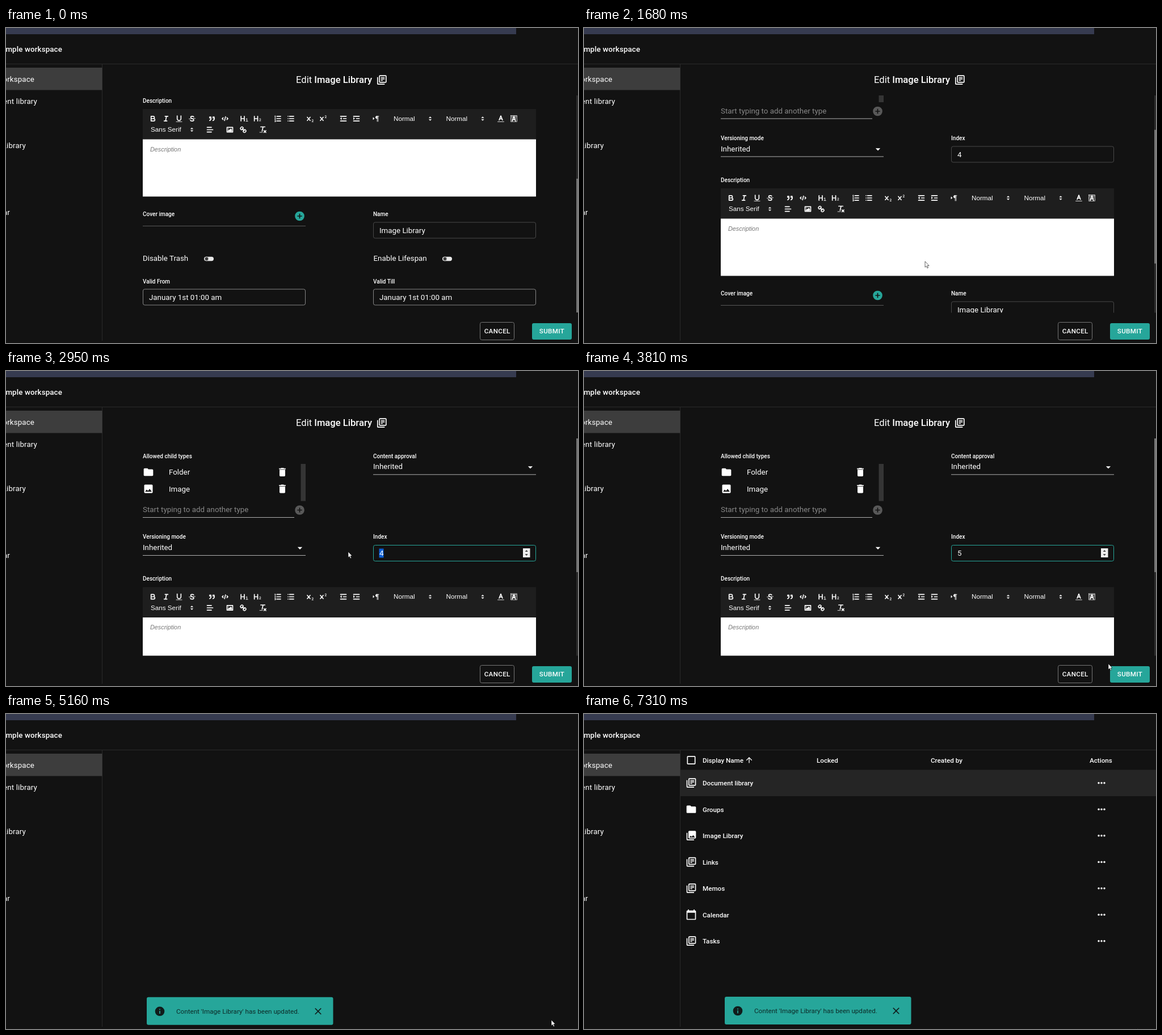
An HTML page for the animation above (7.54 s loop, 1008 by 556 pixels).

```html
<!DOCTYPE html>
<html lang="en">
<head>
<meta charset="utf-8">
<style>
  html, body { margin: 0; width: 100%; height: 100%; overflow: hidden; background: #121212; }
  svg { display: block; }
  text { font: 13.33px Roboto, sans-serif; fill: #fff; white-space: pre; }
  text.label { font-size: 10px; font-weight: 500; }
  text.cell { font-size: 11.66px; font-weight: 500; }
  text.nav { letter-spacing: .125px; text-anchor: end; }
  text.button { font-size: 11.66px; font-weight: 500; letter-spacing: .33px; text-anchor: middle; }
  text.picker { font: 500 11.66px "Liberation Sans", sans-serif; }
  text.hint { font: italic 10.83px "Liberation Sans", sans-serif; fill: #777; }
  .tool { fill: none; stroke: #fff; stroke-width: 2; stroke-linecap: round; stroke-linejoin: round; }
  .tool .thin { stroke-width: 1; }
  .tool .solid { fill: #fff; stroke-width: 1; }
</style>
</head>
<body>
<svg width="1008" height="556" viewBox="0 0 1008 556">
  <defs>
    <clipPath id="formClip"><rect x="230" y="119" width="774" height="383.5"/></clipPath>
    <clipPath id="buttonClip"><rect x="927" y="521" width="70" height="29" rx="3"/></clipPath>
  </defs>
  <g id="shell"></g>
  <g id="editor">
    <g id="heading"></g>
    <g clip-path="url(#formClip)"><g id="form"></g></g>
    <g id="footer"></g>
  </g>
  <g id="list"></g>
  <g id="toast"></g>
  <g id="cursor" stroke-linejoin="round"></g>
</svg>
<script>
const LOOP = 7540, TEAL = '#26a69a', SCROLL = 238.5;
const $ = id => document.getElementById(id);

const rect = (x, y, w, h, fill, extra = '') =>
  `<rect x="${x}" y="${y}" width="${w}" height="${h}" fill="${fill}" ${extra}/>`;
const box = (x, y, w, h, color, extra = '') => rect(x, y, w, h, 'none', `rx="3" stroke="${color}" ${extra}`);
const line = (x, y, w, color) => rect(x, y, w, 1, color);
const text = (x, y, str, cls = '', extra = '') => `<text x="${x}" y="${y}" class="${cls}" ${extra}>${str}</text>`;

// Material icons: 24-unit paths centred on a point
const ICONS = {
  folder: 'M10 4H4c-1.1 0-2 .9-2 2v12c0 1.1.9 2 2 2h16c1.1 0 2-.9 2-2V8c0-1.1-.9-2-2-2h-8z',
  image: 'M21 19V5c0-1.1-.9-2-2-2H5c-1.1 0-2 .9-2 2v14c0 1.1.9 2 2 2h14c1.1 0 2-.9 2-2zM8.5 13.5l2.5 3 3.5-4.5 4.5 6H5z',
  trash: 'M6 19c0 1.1.9 2 2 2h8c1.1 0 2-.9 2-2V7H6zM19 4h-3.5l-1-1h-5l-1 1H5v2h14z',
  books: 'M4 6H2v14c0 1.1.9 2 2 2h14v-2H4zm16-4H8c-1.1 0-2 .9-2 2v12c0 1.1.9 2 2 2h12c1.1 0 2-.9 2-2V4c0-1.1-.9-2-2-2zm0 14H8V4h12zM10 9h8v2h-8zm0 3h4v2h-4zm0-6h8v2h-8z',
  photos: 'M22 16V4c0-1.1-.9-2-2-2H8c-1.1 0-2 .9-2 2v12c0 1.1.9 2 2 2h12c1.1 0 2-.9 2-2zm-11-4l2 2.7 3-3.7 4 5H8zM2 6v14c0 1.1.9 2 2 2h14v-2H4V6z',
  calendar: 'M20 3h-1V1h-2v2H7V1H5v2H4c-1.1 0-2 .9-2 2v16c0 1.1.9 2 2 2h16c1.1 0 2-.9 2-2V5c0-1.1-.9-2-2-2zm0 18H4V8h16z',
  check: 'M19 5v14H5V5h14m0-2H5c-1.1 0-2 .9-2 2v14c0 1.1.9 2 2 2h14c1.1 0 2-.9 2-2V5c0-1.1-.9-2-2-2z',
  up: 'M4 12l1.4 1.4L11 7.8V20h2V7.8l5.6 5.6L20 12l-8-8z',
  down: 'M7 10l5 5 5-5z',
  add: 'M12 2a10 10 0 1 0 0 20 10 10 0 0 0 0-20zm5 11h-4v4h-2v-4H7v-2h4V7h2v4h4z',
  info: 'M12 2a10 10 0 1 0 0 20 10 10 0 0 0 0-20zm1 15h-2v-6h2zm0-8h-2V7h2z',
  close: 'M19 6.4L17.6 5 12 10.6 6.4 5 5 6.4l5.6 5.6L5 17.6 6.4 19l5.6-5.6 5.6 5.6 1.4-1.4-5.6-5.6z'
};
const icon = (name, x, y, fill = '#fff', scale = .833) =>
  `<path d="${ICONS[name]}" fill="${fill}" fill-rule="evenodd" transform="translate(${x} ${y}) scale(${scale}) translate(-12 -12)"/>`;

// Toolbar icons: 18-unit strokes; "thin" and "solid" parts are optional
const tool = (x, y, d, thin = '', solid = '') =>
  `<g class="tool" transform="translate(${x} ${y}) scale(.833) translate(-9 -9)"><path d="${d}"/>` +
  `<path class="thin" d="${thin}"/><path class="solid" d="${solid}"/></g>`;
const picker = (x, y, str, arrow) =>
  text(x, y + 3.5, str, 'picker') + tool(arrow, y, '', '', 'M7 11l2 2 2-2zM7 7l2-2 2 2z');

function toolbar() {
  const a = 398.5, b = 418;
  const two = 'q1.5-2 2.8-.5t-2.8 4.2h3';
  return rect(241, 381.5, 693, 54, '#1e1e1e') +
    tool(259, a, 'M5 4h4.5a2.5 2.5 0 0 1 0 5H5zM5 9h5.5a2.5 2.5 0 0 1 0 5H5z') +
    tool(282, a, 'M7 4h6M5 14h6M8 14l2-10') +
    tool(305, a, 'M5 3v6a4 4 0 0 0 8 0V3', 'M3 15.5h12') +
    tool(328, a, 'M12.3 5.2C11 3.5 6 3.5 6 6.3S12.500 9 12.500 11.700 7 14.800 5.300 12.500', 'M2.500 9.500l13-1') +
    tool(363, a, 'M7 8c0 4-3 5-3 5M14 8c0 4-3 5-3 5', '', 'M4 5h3v3H4zM11 5h3v3h-3z') +
    tool(386, a, 'M5 7L3 9l2 2M13 7l2 2-2 2M10 5L8 13') +
    tool(420, a, 'M2 4v10M9 4v10M2 9h7', 'M12.500 10l2-1.300v5.800M12.500 14.500h4') +
    tool(443.5, a, 'M2 4v10M9 4v10M2 9h7', 'M12.500 10' + two) +
    tool(479, a, 'M7 4h8M7 9h8M7 14h8', 'M2.500 3.500l1-1v3M2.500 5.500h2M2.500 8h2l-2 2.500h2M2.500 12.500h2v3h-2M3 14h1') +
    tool(502, a, 'M6 4h9M6 9h9M6 14h9M3 4h0M3 9h0M3 14h0') +
    tool(536, a, 'M3 6l6 7M9 6l-6 7', 'M12.500 12' + two) +
    tool(559, a, 'M3 6l6 7M9 6l-6 7', 'M12.500 3.500' + two) +
    tool(594.5, a, 'M3 14h12M3 4h12M9 9h6', '', 'M5 7v4L3 9z') +
    tool(617.5, a, 'M3 14h12M3 4h12M9 9h6', '', 'M3 7v4l2-2z') +
    tool(652, a, '', 'M11.500 4v11M13.500 4v11M11 4h4', 'M3 7v4l2-2zM11 3.500a2.700 2.700 0 0 0 0 5.500z') +
    picker(683, a, 'Normal', 747.5) + picker(775.5, a, 'Normal', 840) +
    tool(872, a, 'M5.500 12L9 3l3.500 9M6.400 9.500h5.200', 'M2.500 15.500h13') +
    `<g stroke-dasharray="1.500 1.300">${tool(895, a, '', 'M2.500 2.500h13v13h-13zM4 4h10M4 6h3M11 6h3M4 9h2M12 9h2M4 12h2')}</g>` +
    tool(895, a, 'M5.500 14L9 4.500l3.500 9.500M6.500 11h5') +
    picker(255, b, 'Sans Serif', 327.5) +
    tool(359.5, b, 'M3 4h9M3 9h12M3 14h9') +
    tool(394.5, b, 'M3 4h12v10H3z', '', 'M5 12v-1l2-2 1 1 3-3 2 2v3zM5.500 7h1') +
    tool(418, b, 'M7 7l4 4M8.900 4.600a3.500 3.500 0 0 1-4.300 4.300C3.200 7.500 2 6.400 4.200 4.200S7.500 3.200 8.900 4.600zM13.400 9.100a3.500 3.500 0 0 0-4.300 4.300c1.400 1.400 2.500 2.600 4.700.4s1-3.300-.4-4.700z') +
    tool(453, b, 'M4 3h9M7 12L9 3M11 11l4 4M15 11l-4 4', 'M2 14.500h6');
}

const select = (x, y) =>
  text(x, y, 'Inherited') + line(x, y + 9, 287, '#b0b0b0') + icon('down', x + 277, y - 3.5);
const field = (x, y, str, color) =>
  box(x + .5, y + .5, 286, 28, color) + text(x + 11, y + 19, str);
const toggle = (x, y) =>
  rect(x, y - 3.5, 17, 7.5, '#e8e8e8', 'rx="3.7"') +
  `<circle cx="${x + 4.5}" cy="${y + .2}" r="3.4" fill="#3a3a3a" stroke="#e8e8e8" stroke-width=".8"/>`;

$('shell').innerHTML =
  rect(0, 0, 899, 11, '#363b50') + line(0, 63, 1008, '#2a2a2a') +
  rect(169, 64, 1, 488, '#2a2a2a') + rect(0, 70, 169.5, 39.5, '#3d3d3d') +
  text(99, 41.7, 'Sample workspace', 'nav', 'style="font-weight:500"') +
  [['Workspace', 50, 94.5], ['Document library', 55, 133.7], ['Image Library', 35, 212.2], ['Calendar', 7, 329.5]]
    .map(([str, x, y]) => text(x, y, str, 'nav')).join('');

$('heading').innerHTML =
  text(511, 97.3, 'Edit <tspan font-weight="500">Image Library</tspan>', '', 'style="font-size:16.6px"') +
  icon('books', 662.3, 91.7) +
  rect(1005, 119, 3, 383.5, '#2b2b2b') + rect(1005, 119, 3, 236, '#747474', 'id="thumb"');

$('form').innerHTML =
  text(241, 153.5, 'Allowed child types', 'label') +
  icon('folder', 251, 178.5) + text(287, 183, 'Folder') + icon('trash', 487, 178.5) +
  icon('image', 251, 208) + text(287, 212.5, 'Image') + icon('trash', 487, 208) +
  rect(519.5, 164, 8.5, 65.5, '#353535') +
  text(241, 249, 'Start typing to add another type', '', 'style="fill:#888"') +
  line(241, 258, 267, '#b0b0b0') + icon('add', 517.5, 245.5, '#595959') +
  text(647, 153.5, 'Content approval', 'label') + select(647, 173.3) +
  text(241, 296, 'Versioning mode', 'label') + select(241, 316) +
  text(647, 296, 'Index', 'label') +
  box(647.5, 307.5, 286, 28, '#484848', 'id="indexBox"') +
  rect(657.5, 313.5, 8, 16, '#0a5fd6', 'id="selection"') + text(658, 326, '4', '', 'id="indexValue"') +
  `<g id="spinner">${rect(911, 313, 12.5, 16, '#efefef')}<path d="M914.500 319l2.700-3 2.700 3zM914.500 323l2.700 3 2.700-3z" fill="#444"/></g>` +
  text(241, 370.3, 'Description', 'label') + toolbar() +
  rect(241, 435, 693, 101, '#fff') + text(254, 456, 'Description', 'hint') +
  text(241, 570.8, 'Cover image', 'label') + icon('add', 517.5, 570.5, TEAL) + line(241, 587.5, 287, '#585858') +
  text(647, 570.8, 'Name', 'label') + field(647, 581, 'Image Library', '#484848') +
  text(241, 649.3, 'Disable Trash') + toggle(349, 645.7) +
  text(647.5, 649.3, 'Enable Lifespan') + toggle(769, 645.7) +
  text(241, 689, 'Valid From', 'label') + field(241, 699, 'January 1st 01:00 am', '#858585') +
  text(647, 689, 'Valid Till', 'label') + field(647, 699, 'January 1st 01:00 am', '#858585');

$('footer').innerHTML =
  box(835.5, 519.5, 60, 31, '#777') + text(865.7, 539.3, 'CANCEL', 'button') +
  rect(927, 521, 70, 29, TEAL, 'rx="3" id="submit"') +
  '<circle id="ripple" cx="961" cy="537" fill="#fff" clip-path="url(#buttonClip)"/>' +
  text(962, 539.3, 'SUBMIT', 'button');

const rows = [['Document library', 'books'], ['Groups', 'folder'], ['Image Library', 'photos'], ['Links', 'books'],
  ['Memos', 'books'], ['Calendar', 'calendar'], ['Tasks', 'books']];
$('list').innerHTML =
  rect(170, 98.5, 838, 46.5, '#252525') + icon('check', 189, 81.5) + icon('up', 291, 81.3, '#fff', .65) +
  [[209, 'Display Name'], [410, 'Locked'], [611, 'Created by'], [891, 'Actions']]
    .map(([x, str]) => text(x, 85.6, str, 'cell')).join('') +
  rows.map(([name, type], i) => {
    const y = 121.7 + 46.5 * i;
    return icon(type, 189, y) + text(209, y + 4.3, name, 'cell') +
      [907, 912, 917].map(x => `<circle cx="${x}" cy="${y}" r="1.700" fill="#fff"/>`).join('');
  }).join('');

$('toast').innerHTML =
  rect(248, 499, 328.5, 49, TEAL, 'rx="3"') + icon('info', 271, 524, '#101c1b') +
  text(300, 528.3, "Content 'Image Library' has been updated.", '', 'style="font-size:11.66px;fill:#0d2b28"') +
  icon('close', 550, 524, '#101c1b');

const POINTERS = {
  arrow: '<path d="M0 0v10.300l2.300-2.100 1.600 3.700 1.700-.8L4 7.500h3.100z" fill="#fff" stroke="#000" stroke-width=".6"/>',
  beam: '<path d="M-2.500-7.500h5M0-7.500v15M-2.500 7.500h5" fill="none" stroke="#fff"/>',
  hand: '<path d="M-1 1a1 1 0 0 1 2 0v4l4 .8q1.300.4 1.200 2L5.500 12.500H.2L-3.500 8.200q.6-1.600 2.500 0z" fill="#fff" stroke="#000" stroke-width=".7"/>'
};

// [time, value...] keys with linear motion between them
const scrollKeys = [[1520, SCROLL], [1600, 196], [1680, 98.5], [1760, 36], [1840, 8], [1920, 0]];
const cursorKeys = [[560, 878, 560], [720, 790, 470], [880, 600, 370], [1000, 503, 300], [1120, 540, 278],
  [1280, 680, 401], [1360, 640, 404], [1440, 601, 412], [1920, 601, 412], [2320, 674, 321], [2480, 672, 321],
  [2800, 603, 319], [2960, 603, 319], [3120, 622, 321], [3280, 660, 335], [3600, 850, 470], [3840, 961, 540],
  [6320, 961, 540], [6480, 966, 556], [7200, 968, 558], [7280, 975, 555]];

function track(keys, t) {
  const i = keys.findIndex(k => k[0] > t);
  if (i === 0) return keys[0].slice(1);
  if (i < 0) return keys[keys.length - 1].slice(1);
  const [a, b] = [keys[i - 1], keys[i]];
  const p = (t - a[0]) / (b[0] - a[0]);
  return a.slice(1).map((v, j) => v + (b[j + 1] - v) * p);
}
const show = (id, on) => $(id).setAttribute('display', on ? 'inline' : 'none');
const set = (id, name, value) => $(id).setAttribute(name, value);

function draw(t) {
  const beat = Math.floor(t / 80) * 80;
  const [offset] = track(scrollKeys, beat);
  const [x, y] = track(cursorKeys, beat);
  const editing = t < 4990;
  const focused = t >= 2400 && t < 4190;
  const hover = editing && x > 927 && x < 997 && y > 521 && y < 550;
  const inField = t > 2200 && t < 4000 && x > 647 && x < 934 && y > 307 && y < 336;

  show('editor', editing);
  show('list', t >= 5850);
  set('form', 'transform', `translate(0 ${-offset})`);
  set('thumb', 'y', 119 + offset * 147 / SCROLL);

  set('indexBox', 'stroke', focused ? TEAL : '#484848');
  show('spinner', focused || inField);
  show('selection', t >= 2560 && t < 3180);
  $('indexValue').textContent = t < 3180 ? '4' : '5';

  set('submit', 'fill', hover ? '#1f7b72' : TEAL);
  const press = Math.min(Math.max((t - 4190) / 240, 0), 1);
  set('ripple', 'r', 29 * press);
  set('ripple', 'opacity', t < 4520 ? .12 : 0);

  const rise = Math.min(Math.max((t - 4990) / 225, 0), 1);
  show('toast', t >= 4990);
  set('toast', 'transform', `translate(0 ${57 * (1 - rise) ** 3})`);

  show('cursor', t >= 590);
  set('cursor', 'transform', `translate(${x} ${y})`);
  const pointer = hover ? 'hand' : inField ? 'beam' : 'arrow';
  if ($('cursor').dataset.kind !== pointer) {
    $('cursor').dataset.kind = pointer;
    $('cursor').innerHTML = POINTERS[pointer];
  }
}

const start = performance.now();
function tick() {
  draw((performance.now() - start) % LOOP);
  requestAnimationFrame(tick);
}
tick();
</script>
</body>
</html>
```
